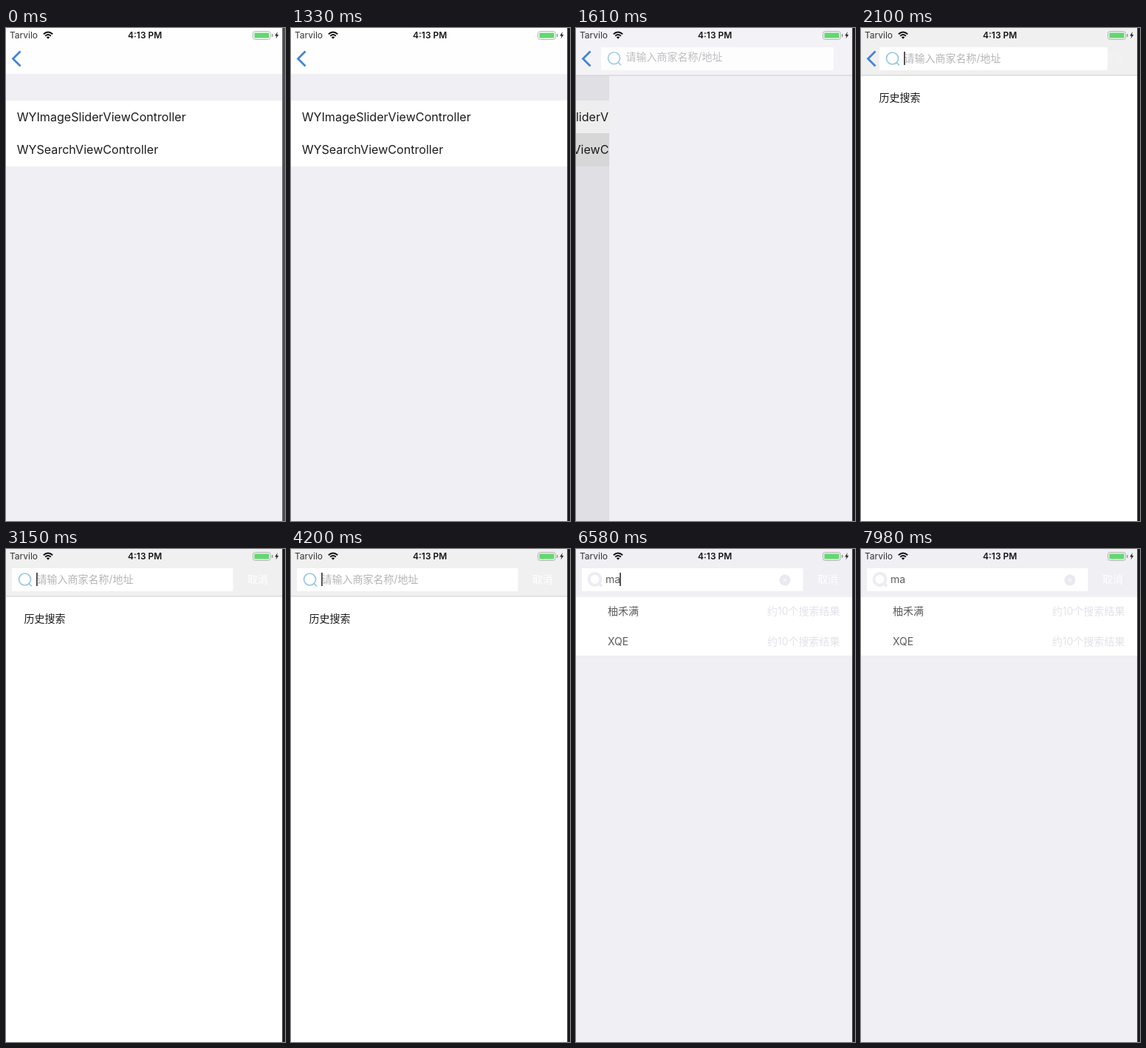
Recreate the animation shown at these times as an HTML page with a canvas. Size 378 by 666 pixels, loop 8050 ms.

```html
<!DOCTYPE html>
<html lang="zh">
<head>
<meta charset="utf-8">
<style>
  html, body { margin: 0; width: 100%; height: 100%; overflow: hidden; background: #efeff4; }
  canvas { display: block; }
</style>
</head>
<body>
<canvas id="stage" width="378" height="666"></canvas>
<script>
const ctx = document.getElementById('stage').getContext('2d');
const LOOP = 8050, STEP = 70;
const PUSH = 1400, FOCUS = 2100, TYPE = 4690;
const PAGE = '#efeff4';
const FONT = 'Inter, "Noto Sans CJK SC", "Noto Sans CJK", sans-serif';

const clamp = v => Math.max(0, Math.min(1, v));
const progress = (t, start, length) => clamp((t - start) / length);
const mix = (a, b, k) => a + (b - a) * k;
const easeOut = k => 1 - (1 - k) ** 4;
const smooth = k => k * k * (3 - 2 * k);

function rect(x, y, w, h, color) {
  ctx.fillStyle = color;
  ctx.fillRect(x, y, w, h);
}

function text(str, x, baseline, size, color, weight = 400) {
  ctx.font = `${weight} ${size}px ${FONT}`;
  ctx.fillStyle = color;
  ctx.fillText(str, x, baseline);
}

function stroke(path, color, width) {
  ctx.strokeStyle = color;
  ctx.lineWidth = width;
  ctx.stroke(new Path2D(path));
}

function faded(alpha, draw) {
  ctx.save();
  ctx.globalAlpha *= alpha;
  draw();
  ctx.restore();
}

function drawStatusBar() {
  text('Tarvilo', 5, 14, 12, '#333');
  text('4:13 PM', 165, 14, 12, '#151515', 600);
  // Wi-Fi fan
  stroke('M50.8 8.2Q57 2.6 63.2 8.2M53.2 10.8Q57 7.4 60.8 10.8', '#111', 1.9);
  ctx.fillStyle = '#111';
  ctx.fill(new Path2D('M54.8 12.4Q57 10.6 59.2 12.4L57 14.8Z'));
  // Battery and charging bolt
  ctx.beginPath();
  ctx.roundRect(334.5, 4.5, 24, 11, 3);
  ctx.strokeStyle = '#b2b6b4';
  ctx.lineWidth = 1;
  ctx.stroke();
  rect(336.5, 6.5, 20, 7, '#63d76f');
  rect(360, 8, 1.5, 4, '#999');
  ctx.fillStyle = '#222';
  ctx.fill(new Path2D('M368 5L364.2 10.6H366.6L365.5 14.5L369.4 8.9H367Z'));
}

function drawMenu(shift, visibleWidth, dim, selected) {
  ctx.save();
  ctx.beginPath();
  ctx.rect(0, 62, visibleWidth, 604);
  ctx.clip();
  rect(0, 62, 375, 604, PAGE);
  rect(0, 98, 375, 89, '#fff');
  if (selected) rect(0, 142, 375, 45, '#e6e6e6');
  text('WYImageSliderViewController', 14.7 + shift, 126, 16.1, '#1c1c1c');
  text('WYSearchViewController', 14.7 + shift, 170, 16.1, '#1c1c1c');
  rect(0, 62, 375, 604, `rgba(0,0,0,${dim})`);
  ctx.restore();
}

function drawResults() {
  rect(0, 65, 375, 79, '#fff');
  ['柚禾满', 'XQE'].forEach((name, i) => {
    const baseline = 89 + i * 41;
    text(name, 43, baseline, 14, '#5c5c5c');
    text('约10个搜索结果', 259, baseline, 14, '#e2e2e9');
  });
}

function drawMagnifier(x, y, typed) {
  const color = typed ? '#ecedf3' : '#96c6e0';
  ctx.save();
  ctx.translate(x, y);
  stroke('M-8 0A8 8 0 1 1 8 0A8 8 0 1 1 -8 0M5.8 5.8L9.5 9.5', color, typed ? 4 : 1.7);
  ctx.restore();
}

function cursorAlpha(t) {
  if (t < 1960) return 0;
  const typed = t >= 4830;
  const phase = (t - (typed ? 3990 : 1960)) % 1050;
  const hold = typed ? 560 : 610;
  return progress(phase, -35, 70) * (1 - progress(phase, hold, 210));
}

function drawSearch(t, push) {
  const slide = smooth(progress(t, FOCUS, 280));
  const away = 1 - push;
  const left = mix(25, 8, slide) + away * 75;
  const right = mix(334, 307.5, slide) + away * 125;
  const lift = away * 16;
  const query = t < TYPE ? '' : t < 4830 ? 'm' : 'ma';

  rect(left, 26, right - left, 31, '#fff');
  drawMagnifier(left + 17.5, 41 - lift / 8, query);
  if (query) {
    text(query, 40, 46, 14, '#606060');
    ctx.fillStyle = '#e9eaf0';
    ctx.beginPath();
    ctx.arc(283, 42, 7.5, 0, Math.PI * 2);
    ctx.fill();
    stroke('M280.8 39.8L285.2 44.2M285.2 39.8L280.8 44.2', '#f7f7fa', 1.2);
  } else {
    text('请输入商家名称/地址', left + 33.5, 46 - lift, 14, '#b5b5b8');
  }
  faded(cursorAlpha(t), () => {
    const x = query ? 39 + ctx.measureText(query).width : left + 33;
    rect(x, 32, 1.8, 18, '#444');
  });
  faded(progress(t, 2030, 280), () => text('取消', 327, 46, 14, '#fff'));
}

function draw(t) {
  const push = easeOut(progress(t, PUSH, 510));
  const newLeft = 375 * (1 - push);
  const typed = t >= TYPE;
  const pushing = t >= PUSH;

  rect(0, 0, 378, 666, PAGE);
  if (push < 1) drawMenu(-112 * push, newLeft, 0.075 * push, pushing);

  faded(progress(t, 1890, 140), () => {
    if (typed) return;
    rect(0, 64, 375, 602, '#fff');
    text('历史搜索', 24.5, 99, 14, '#1a1a1a');
  });
  if (typed) drawResults();

  const navColor = typed ? PAGE : t >= 1960 ? '#f0f0f0' : pushing ? '#f3f3f7' : '#fefefe';
  rect(0, 0, 375, pushing ? 64 : 62, navColor);
  if (pushing && !typed) rect(0, 63.5, 375, 1, '#d0d0d3');

  if (pushing) faded(push, () => drawSearch(t, push));
  faded(1 - progress(t, FOCUS, 210), () => stroke('M19.5 31.5L9.5 41.5L19.5 51.5', '#4284d3', 2.8));
  drawStatusBar();
  rect(374.3, 0, 3.7, 666, t < 1330 ? '#4c4c50' : '#1b1b1d');
}

function tick(now) {
  draw(Math.floor((now % LOOP) / STEP) * STEP);
  requestAnimationFrame(tick);
}
requestAnimationFrame(tick);
</script>
</body>
</html>
```
